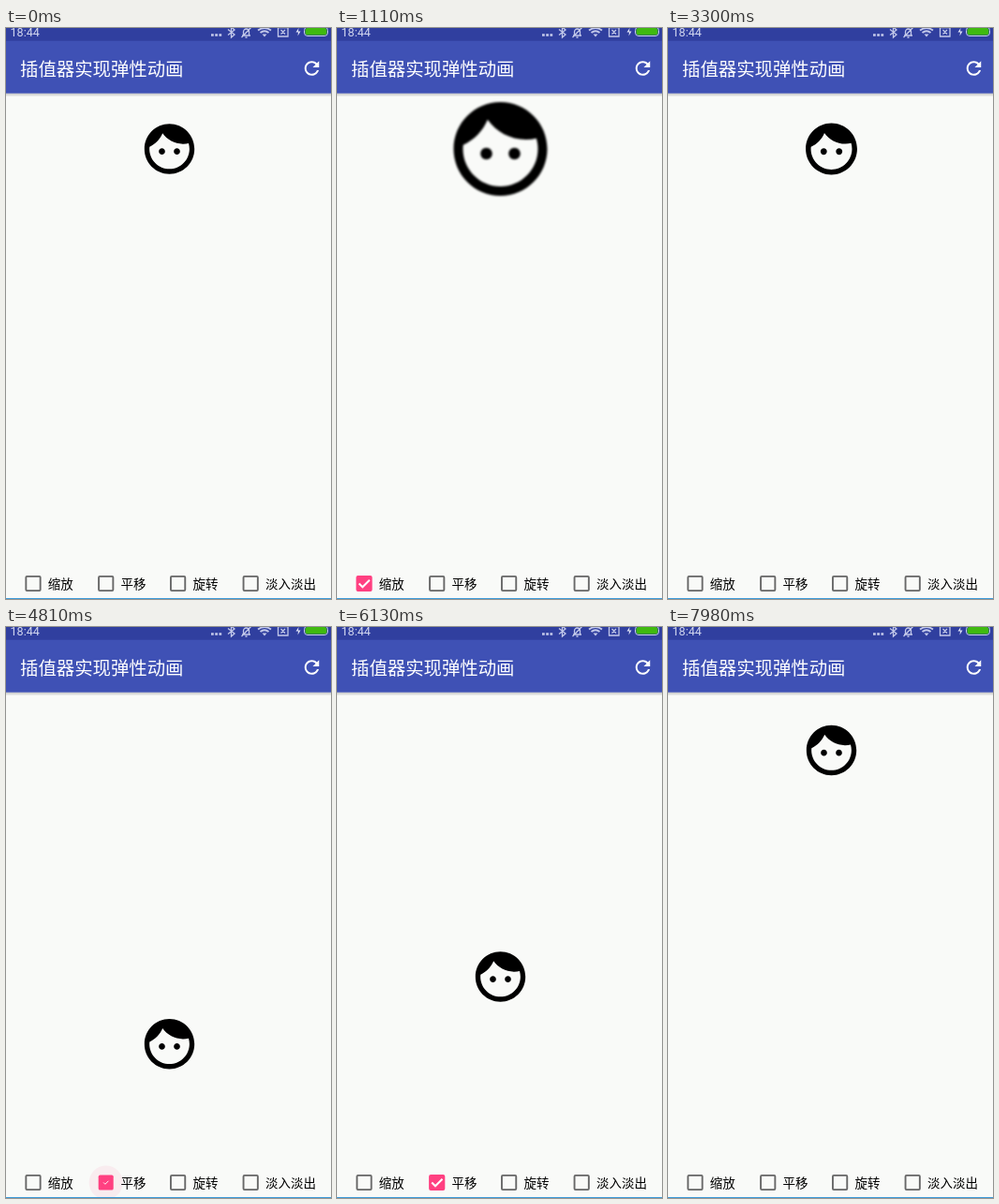
An HTML page that plays this animation: 347x609 px, repeating every 8000 ms.

```html
<!DOCTYPE html>
<html lang="zh-CN">
<head>
<meta charset="utf-8">
<title>弹性动画</title>
<style>
html, body { margin: 0; width: 100%; height: 100%; overflow: hidden; background: #f9faf8; }
svg { display: block; width: 347px; height: 609px; }
text { font-family: "Noto Sans CJK SC", "Noto Sans CJK", sans-serif; }
.soft { filter: blur(.5px); }
.clock { font: 12.6px Roboto, sans-serif; fill: #d3d8f0; }
.status { fill: none; stroke: #c3c9ea; stroke-width: 1.3; }
.label { font-size: 13.5px; fill: #000; }
</style>
</head>
<body>
<svg viewBox="0 0 347 609">
  <defs>
    <linearGradient id="shade" x2="0" y2="1">
      <stop stop-color="#000" stop-opacity=".22"/>
      <stop offset="1" stop-color="#000" stop-opacity="0"/>
    </linearGradient>
  </defs>
  <rect width="347" height="609" fill="#f9faf8"/>

  <g id="face" class="soft">
    <path transform="scale(2.67) translate(-12 -12)" d="M9 11.75c-.69 0-1.25.56-1.25 1.25s.56 1.25 1.25 1.25 1.25-.56 1.25-1.25-.56-1.25-1.25-1.25zm6 0c-.69 0-1.25.56-1.25 1.25s.56 1.25 1.25 1.25 1.25-.56 1.25-1.25-.56-1.25-1.25-1.25zM12 2C6.48 2 2 6.48 2 12s4.48 10 10 10 10-4.48 10-10S17.52 2 12 2zm0 18c-4.41 0-8-3.59-8-8 0-.29.02-.58.05-.86 2.36-1.05 4.23-2.98 5.21-5.37C11.07 8.33 14.05 10 17.42 10c.78 0 1.53-.09 2.25-.26.21.71.33 1.47.33 2.26 0 4.41-3.59 8-8 8z"/>
  </g>

  <g id="boxes"></g>

  <g class="soft">
    <rect x="-5" y="69.500" width="357" height="4" fill="url(#shade)"/>
    <rect x="-5" y="-5" width="357" height="74.700" fill="#3f51b5"/>
    <rect x="-5" y="-5" width="357" height="18.700" fill="#303f9f"/>
    <text class="clock" x="4.500" y="9">18:44</text>
    <text x="15" y="50.500" font-size="19.400" fill="#fff">插值器实现弹性动画</text>
    <path fill="#fff" transform="translate(326.500 43) scale(.97) translate(-12 -12)" d="M17.65 6.35C16.2 4.9 14.21 4 12 4c-4.42 0-7.99 3.58-7.99 8s3.57 8 7.99 8c3.73 0 6.84-2.55 7.73-6h-2.08c-.82 2.33-3.04 4-5.65 4-3.31 0-6-2.69-6-6s2.69-6 6-6c1.66 0 3.14.69 4.22 1.78L13 11h7V4l-2.35 2.35z"/>

    <g class="status">
      <path d="M219 7.5h2.8M223.2 7.5h2.800M227.400 7.500h2.800" stroke-width="2.600"/>
      <path d="M237 1.500l7 5.500-3.500 3V-1l3.500 3-7 5.500"/>
      <path d="M252 8h9M253.500 8V4a3 3 0 0 1 6 0v4M251.500 10L262-1M255.500 10h2"/>
      <path d="M269 2.500q7-5 14 0M271.500 5q4.500-3.500 9 0" stroke-width="1.900"/>
      <path d="M273.500 6.500h5l-2.500 3z" fill="#c3c9ea" stroke="none"/>
      <path d="M290.500-.5h10.500V9h-10.500zM293.500 2l4.500 4.500M298 2l-4.500 4.500"/>
      <path d="M312.500 0l-3 4.500h2.500l-.5 4 3-5h-2.500z" fill="#dde1f5" stroke="none"/>
      <rect x="318.500" y="-1" width="25" height="9.500" rx="3.500" stroke-width="1"/>
      <rect x="319.500" y="0" width="23" height="7.500" rx="2.500" fill="#3fb910" stroke="none"/>
    </g>
  </g>
  <rect y="608" width="347" height="1" fill="#3d9bd9"/>
</svg>

<script>
const LOOP = 8000, REST_Y = 129, TRAVEL = 244, TOGGLE = 320;
const face = document.getElementById('face');
const boxes = document.getElementById('boxes');

const clamp = v => Math.min(1, Math.max(0, v));
const ramp = (t, from, to) => clamp((t - from) / (to - from));

// Elastic step from 0 to 1 with period 0.3
function spring(t, { start, duration }) {
  const x = (t - start) / duration;
  if (x <= 0) return 0;
  if (x >= 1) return 1;
  return 1 - 2 ** (-10 * x) * Math.cos(x * 2 * Math.PI / 0.3);
}

const toggleSpring = (t, on, off) => t < off.start ? spring(t, on) : 1 - spring(t, off);

const scaleOn = { start: 510, duration: 2200 }, scaleOff = { start: 2472, duration: 2310 };
const moveOn = { start: 4563, duration: 2325 }, moveOff = { start: 6280, duration: 2700 };

const options = [
  { label: '缩放', x: 29, on: 500, off: 2440 },
  { label: '平移', x: 106.7, on: 4580, off: 6250 },
  { label: '旋转', x: 183.6 },
  { label: '淡入淡出', x: 261.2 }
];

for (const option of options) {
  boxes.insertAdjacentHTML('beforeend', `
    <g class="soft" transform="translate(${option.x} 592.5)">
      <circle fill="#ff4081" opacity="0"/>
      <g><rect x="-8.6" y="-8.6" width="17.2" height="17.2" rx="2"/>
        <rect fill="#f9faf8"/>
        <path fill="none" stroke="#fff" stroke-width="2" d="M-5.5 0l3.8 3.8 7.5-7.5"/></g>
      <text class="label" x="15.8" y="5">${option.label}</text>
    </g>`);
  const group = boxes.lastElementChild;
  option.ripple = group.querySelector('circle');
  option.box = group.querySelector('g');
  [option.frame, option.hole] = group.querySelectorAll('rect');
  option.tick = group.querySelector('path');
  drawBox(option, 0);
}

function mix(a, b, k) {
  return `rgb(${a.map((v, i) => Math.round(v + (b[i] - v) * k))})`;
}

// progress: 0 is empty, 1 is ticked; the box fills first, then the tick grows
function drawBox({ box, frame, hole, tick }, progress) {
  const fill = ramp(progress, 0, 0.55), grow = ramp(progress, 0.55, 1);
  const half = 6.7 * (1 - fill);
  frame.setAttribute('fill', mix([104, 104, 104], [255, 64, 129], fill));
  for (const [name, value] of [['x', -half], ['y', -half], ['width', 2 * half], ['height', 2 * half]])
    hole.setAttribute(name, value);
  tick.setAttribute('transform', `scale(${0.2 + 0.8 * grow})`);
  tick.setAttribute('opacity', grow > 0 ? 1 : 0);
  box.setAttribute('transform', `scale(${1 - 0.09 * Math.sin(Math.PI * progress)})`);
}

function draw(t) {
  const scale = 1 + toggleSpring(t, scaleOn, scaleOff);
  const y = REST_Y + TRAVEL * toggleSpring(t, moveOn, moveOff);
  face.setAttribute('transform', `translate(174.5 ${y}) scale(${scale})`);
  for (const option of options) {
    if (!option.on) continue;
    const { on, off, ripple } = option;
    drawBox(option, ramp(t, on, on + TOGGLE) - ramp(t, off, off + TOGGLE));
    ripple.setAttribute('r', 10 + 8 * ramp(t, on, on + 200));
    ripple.setAttribute('opacity', 0.07 * (ramp(t, on, on + 120) - ramp(t, on + 230, on + 480)));
  }
}

const begin = performance.now();
function tickFrame() {
  draw((performance.now() - begin) % LOOP);
  requestAnimationFrame(tickFrame);
}
tickFrame();
</script>
</body>
</html>
```
